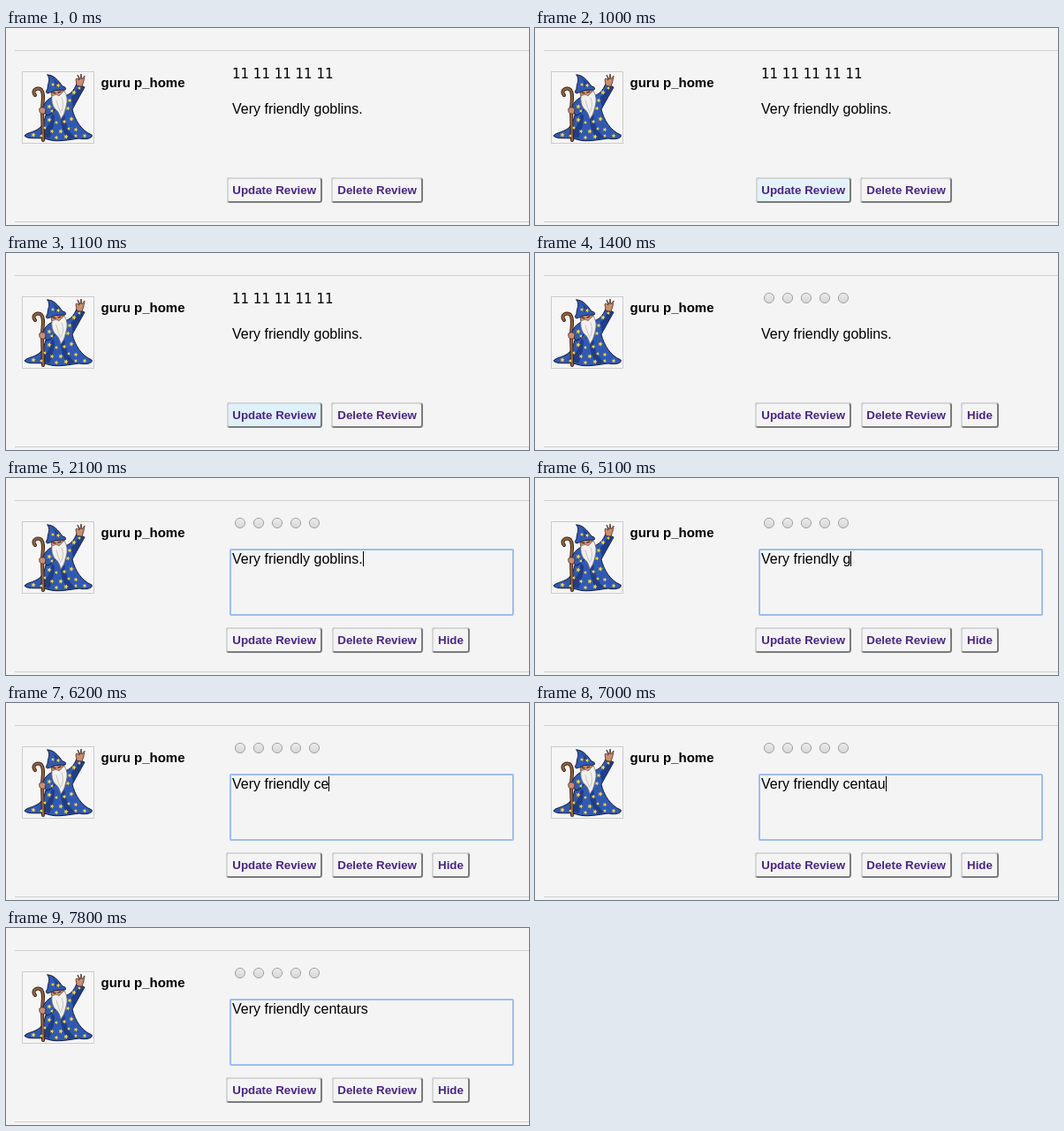
Animation, 592 px wide and 223 px high, one loop 8 s. Source, as an HTML page with a canvas:

```html
<!DOCTYPE html>
<html lang="en">
<head>
<meta charset="utf-8">
<title>Review editor</title>
<style>
html, body { margin: 0; width: 592px; height: 223px; overflow: hidden; background: #f4f4f4; }
canvas, svg { position: absolute; left: 0; top: 0; display: block; }
text { font: 16px "Liberation Sans", Arial, sans-serif; fill: #000; }
.name { font-size: 15px; font-weight: bold; }
.rating { font: 15px "DejaVu Sans", sans-serif; }
.button { font-size: 13.333px; font-weight: bold; fill: #4a2587; }
</style>
</head>
<body>
<canvas id="stage" width="592" height="223"></canvas>
<svg width="592" height="223">
  <text class="name" x="107.5" y="67">guru p_home</text>
  <text class="rating" id="rating" x="256" y="57">11 11 11 11 11</text>
  <text id="review" x="256" y="97">Very friendly goblins.</text>
  <text class="button" id="update" x="256.3" y="188">Update Review</text>
  <text class="button" x="375.3" y="188">Delete Review</text>
  <text class="button" id="hide" x="489" y="188">Hide</text>
</svg>
<script>
const LOOP = 8000, PAGE = '#f4f4f4';
const OPEN_AT = 1200, EDIT_AT = 2100;
const PREFIX = 'Very friendly ';
const ctx = document.getElementById('stage').getContext('2d');
const [rating, review, update, hide] =
  ['rating', 'review', 'update', 'hide'].map(id => document.getElementById(id));

const words = [[0, 'goblins.'], [4100, 'goblins'], [4200, 'goblin'], [4500, 'gobli'],
  [4600, 'gobl'], [4700, 'gob'], [4900, 'go'], [5100, 'g'], [5300, ''], [6000, 'c'],
  [6200, 'ce'], [6400, 'cen'], [6600, 'cent'], [6800, 'centa'], [7000, 'centau'],
  [7100, 'centaur'], [7200, 'centaurs']];
const caret = [[0, false], [2100, true], [2700, false], [3300, true], [3900, false],
  [4400, true], [5700, false], [6000, true], [7800, false]];
const hoverFill = [[0, PAGE], [1000, '#e4f3fb'], [1100, '#dff1fb'], [1200, '#e4f3fb'],
  [1300, '#edf4f8'], [1400, PAGE]];
const hoverText = [[0, '#4a2587'], [700, '#583695'], [800, '#4a2587']];

// Value of the last keyframe that has been reached
const at = (keys, t) => keys.filter(([time]) => time <= t).pop()[1];

function rect(color, x, y, w, h) {
  ctx.fillStyle = color;
  ctx.fillRect(x, y, w, h);
}

function shape(d, fill, stroke, width = 1) {
  const path = new Path2D(d);
  if (fill) { ctx.fillStyle = fill; ctx.fill(path); }
  if (stroke) { ctx.strokeStyle = stroke; ctx.lineWidth = width; ctx.stroke(path); }
}

function star(x, y, r) {
  ctx.beginPath();
  for (let i = 0; i < 10; i++) {
    const a = i * Math.PI / 5 - 1.3, d = i % 2 ? r * 0.45 : r;
    ctx.lineTo(x + d * Math.cos(a), y + d * Math.sin(a));
  }
  ctx.fillStyle = '#f3d93a';
  ctx.fill();
}

function wizard() {
  const ink = '#141a3c', blue = '#3159b4', dark = '#203d86', skin = '#c98f70';
  ctx.lineCap = ctx.lineJoin = 'round';
  shape('M51 79C45 88 47 101 40 111C35 118 23 118 21 122C25 127 38 123 47 126C58 130 73 126 83 125C92 127 99 124 97 121C85 116 78 104 75 92L89 67L80 63C77 71 72 76 66 77Z', blue, ink);
  shape('M52 97Q50 113 37 121L49 125Q55 112 55 99ZM66 96Q67 114 78 124L70 126Q62 114 62 104Z', dark);
  shape('M74 78Q78 76 82 66L88 67L76 91Z', dark);
  shape('M80 65C80 61 78 58 80 57L83 59L81 53L84 58L85 52L86 58L89 54L88 60L86 66Z', skin, '#4a2a20', 0.8);
  shape('M42 127L41 93C41 84 44 75 40 70C36 66 28 71 33 76', null, '#3e2416', 4);
  shape('M42 127L41 93C41 84 44 75 40 70C36 66 28 71 33 76', null, '#98683f', 2);
  shape('M53 78C45 81 43 87 41 91L46 99C52 98 57 92 58 86Z', blue, ink);
  shape('M38 91Q42 88 45 92L44 97Q39 98 38 95Z', skin, '#4a2a20', 0.8);
  shape('M51 71Q51 79 56 82L65 79L65 69Z', skin, '#4a2a20', 0.8);
  shape('M52 77Q57 74 60 77L66 71Q71 79 68 89Q66 99 62 103Q60 94 55 91Q51 85 52 77Z', '#f1f0ec', '#77736f', 0.8);
  shape('M57 82Q59 90 62 96M63 79Q66 86 63 94', null, '#bdb9b5', 0.8);
  shape('M53 73L56 74M59 73L62 72', null, '#2a1a16', 1.2);
  shape('M47 53C54 53 59 59 64 66Q69 67 67 70Q56 69 47 74Q44 73 47 69C47 62 51 59 47 53Z', blue, ink);
  shape('M52 56Q58 60 61 66L56 67Q57 61 52 56Z', dark);
  const stars = [[53, 64], [59, 65], [49, 89], [52, 94], [72, 82], [77, 73], [83, 68], [70, 91],
    [49, 104], [57, 107], [66, 106], [74, 103], [44, 113], [52, 117], [62, 117], [71, 114],
    [79, 115], [31, 121], [40, 122], [57, 124], [68, 123], [79, 122], [89, 122]];
  stars.forEach(([x, y], i) => star(x, y, 2.2 + i % 3 * 0.35));
}

function button(x, right, fill = PAGE) {
  const y = 169, w = right - x, h = 29;
  const box = (inset, color, r) => {
    ctx.beginPath();
    ctx.roundRect(x + inset, y + inset, w - 2 * inset, h - 2 * inset, r);
    ctx.fillStyle = color;
    ctx.fill();
  };
  box(0, '#7b7b7b', 3.5);
  ctx.save();
  ctx.clip(new Path2D(`M${x} ${y}h${w}l-2 2L${x + 2} ${y + h - 2}l-2 2Z`));
  box(0, '#d6d6d6', 3.5);
  ctx.restore();
  box(2, fill, 1.5);
}

function radio(x) {
  const shade = ctx.createLinearGradient(0, 45, 0, 57);
  shade.addColorStop(0, '#ececec');
  shade.addColorStop(1, '#d6d6d6');
  ctx.beginPath();
  ctx.arc(x, 51, 5.6, 0, 7);
  ctx.fillStyle = shade;
  ctx.fill();
  ctx.strokeStyle = '#a2a2a2';
  ctx.lineWidth = 1;
  ctx.stroke();
}

function draw(t) {
  const open = t >= OPEN_AT, editing = t >= EDIT_AT, text = PREFIX + at(words, t);

  rect(PAGE, 0, 0, 592, 223);
  rect('#cfcfcf', 10, 25, 582, 1);
  rect('#cfcfcf', 10, 219, 582, 1);
  rect('#cbcbcb', 18, 49, 82, 82);
  rect('#f6f6f6', 19, 50, 80, 80);
  wizard();

  button(open ? 249 : 250, 358, at(hoverFill, t));
  button(open ? 369 : 368, 472);
  if (open) {
    button(482, 525);
    for (let i = 0; i < 5; i++) radio(265 + 21 * i);
  }
  if (editing) {
    ctx.beginPath();
    ctx.roundRect(254, 81, 320, 74, 1);
    ctx.strokeStyle = '#9dbdee';
    ctx.lineWidth = 2;
    ctx.stroke();
  }
  if (at(caret, t)) {
    ctx.font = '16px "Liberation Sans", Arial, sans-serif';
    rect('#000', Math.round(256 + ctx.measureText(text).width), 83, 1, 17);
  }

  review.textContent = text;
  update.style.fill = at(hoverText, t);
  rating.style.display = open ? 'none' : '';
  hide.style.display = open ? '' : 'none';
}

function tick() {
  draw(performance.now() % LOOP);
  requestAnimationFrame(tick);
}
tick();
</script>
</body>
</html>
```
